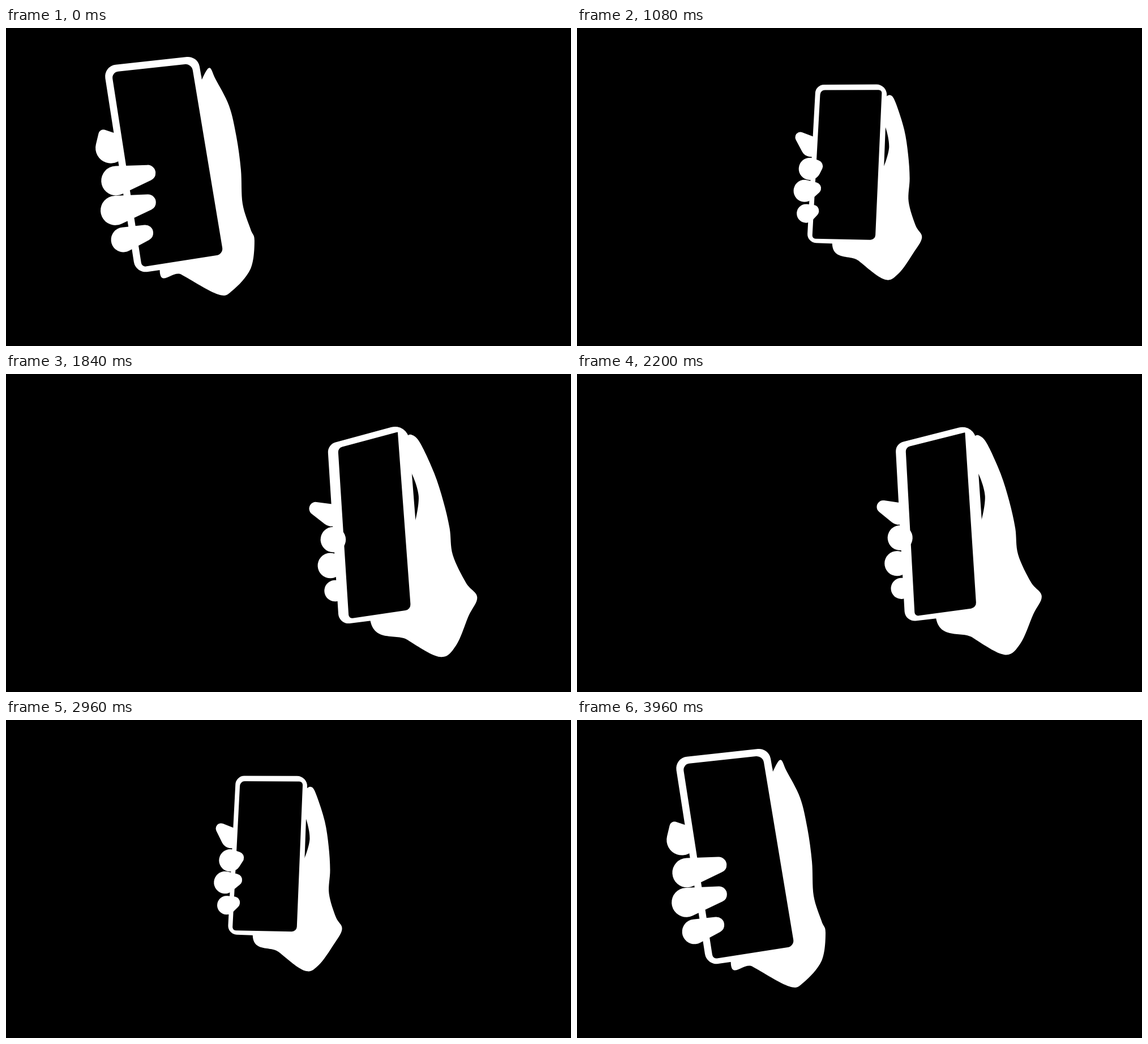
An HTML page with a canvas that plays this animation: 998x561 px, repeating every 4 s.

```html
<!DOCTYPE html>
<html lang="en">
<head>
<meta charset="utf-8">
<title>Hand turning a phone</title>
<style>
  html, body { margin: 0; width: 100%; height: 100%; overflow: hidden; background: #000; }
  canvas { display: block; width: 100%; height: 100%; }
</style>
</head>
<body>
<canvas id="stage" width="998" height="561"></canvas>
<script>
const ctx = document.getElementById('stage').getContext('2d');
const LOOP = 4000, STEP = 40, TURN = 1990;
const WHITE = '#fff', BLACK = '#000';

// Ends of the phone's left edge, perspective skew, screen inset, and how far the hand has swung.
const TIMES = [0, 640, 1380, TURN];
const KEYS = {
  left: [172, 300, 493.5, 574],
  top: [67, 87, 109, 126],
  footX: [229, 307, 484, 598],
  footY: [433, 392, 394, 448],
  skew: [0.021, 0.004, -0.055, -0.095],
  inset: [0.034, 0.018, 0.046, 0.057],
  swing: [0, 0.5, 1, 1.15]
};

// Smooth curve through the keys, at rest at both ends.
function track(values) {
  const m = values.map(() => 0);
  for (let pass = 0; pass < 40; pass++) {
    for (let i = 1; i < values.length - 1; i++) {
      const a = TIMES[i] - TIMES[i - 1], b = TIMES[i + 1] - TIMES[i];
      const pull = (values[i] - values[i - 1]) / (a * a) + (values[i + 1] - values[i]) / (b * b);
      m[i] = (3 * pull - m[i - 1] / a - m[i + 1] / b) / (2 / a + 2 / b);
    }
  }
  return u => {
    let i = 0;
    while (i < TIMES.length - 2 && u >= TIMES[i + 1]) i++;
    const h = TIMES[i + 1] - TIMES[i], s = (u - TIMES[i]) / h, r = 1 - s;
    return values[i] * r * r * (1 + 2 * s) + values[i + 1] * s * s * (3 - 2 * s)
      + h * s * r * (m[i] * r - m[i + 1] * s);
  };
}

const tracks = Object.entries(KEYS).map(([name, values]) => [name, track(values)]);
const poseAt = u => Object.fromEntries(tracks.map(([name, f]) => [name, f(u)]));
const mix = (a, b, k) => a + (b - a) * k;

// Outline of palm and thumb, from the thumb round the wrist, in units of the phone's height.
const HAND_OPEN = [
  [.423, .18], [.454, .117], [.498, .064], [.519, .122], [.563, .258],
  [.575, .412], [.572, .573], [.555, .738], [.574, .866], [.584, .923],
  [.545, 1.056], [.444, 1.147], [.374, 1.156], [.215, 1.036], [.123, .965]
];
const HAND_TURNED = [
  [.419, .141], [.445, .075], [.479, .071], [.516, .125], [.578, .286],
  [.615, .438], [.637, .583], [.642, .723], [.7, .87], [.751, .946],
  [.699, 1.039], [.616, 1.175], [.526, 1.22], [.354, 1.113], [.167, .959]
];

const FINGERS = [
  { x: -0.015, y: 0.55, r: 0.07, reach: 0.112 },
  { x: -0.04, y: 0.69, r: 0.07, reach: 0.092 },
  { x: -0.023, y: 0.833, r: 0.059, reach: 0.057 }
];

// Maps phone units to the stage: scale and tilt of the left edge, plus the skew.
function placer({ left, top, footX, footY, skew }) {
  const dx = footX - left, dy = footY - top;
  return ([x, y]) => {
    const v = y + skew * x / 0.45 * (1 - 0.7 * y);
    return [left + x * dy + v * dx, top - x * dx + v * dy];
  };
}

function fillBlob(points, color) {
  const n = points.length, at = i => points[(i + n) % n];
  ctx.fillStyle = color;
  ctx.beginPath();
  ctx.moveTo(...points[0]);
  for (let i = 0; i < n; i++) {
    const [a, b, c, d] = [at(i - 1), at(i), at(i + 1), at(i + 2)];
    ctx.bezierCurveTo(
      b[0] + (c[0] - a[0]) / 6, b[1] + (c[1] - a[1]) / 6,
      c[0] - (d[0] - b[0]) / 6, c[1] - (d[1] - b[1]) / 6, ...c);
  }
  ctx.fill();
}

function fillQuad(corners, radii, color) {
  const [first, , , last] = corners;
  ctx.fillStyle = color;
  ctx.beginPath();
  ctx.moveTo((first[0] + last[0]) / 2, (first[1] + last[1]) / 2);
  corners.forEach((c, i) => ctx.arcTo(...c, ...corners[(i + 1) % 4], radii[i]));
  ctx.fill();
}

// Two circles and the tangents that join them.
function fillCapsule(p, r, q, s, color) {
  const dx = q[0] - p[0], dy = q[1] - p[1];
  const a = Math.atan2(dy, dx);
  const b = Math.acos(Math.max(-1, Math.min(1, (r - s) / Math.hypot(dx, dy))));
  ctx.fillStyle = color;
  ctx.beginPath();
  ctx.arc(...p, r, a + b, a - b + 2 * Math.PI);
  ctx.arc(...q, s, a - b, a + b);
  ctx.fill();
}

function drawHand(pose, place) {
  const { swing } = pose;
  const outline = HAND_OPEN.map((p, i) => p.map((v, axis) => mix(v, HAND_TURNED[i][axis], swing)));
  fillBlob(outline.map(place), WHITE);
  const bulge = 0.44 + 0.046 * Math.min(1, 2 * swing);
  fillBlob([[.435, .23], [bulge, .39], [.435, .56], [.42, .4]].map(place), BLACK);
}

function drawPhone({ skew, inset, size }, place) {
  const scale = r => Math.max(0.002, r) * size;
  const body = [[0, 0], [.452, 0], [.468, 1], [0, 1]];
  fillQuad(body.map(place), [.056, .06 - 0.2 * skew, .04, .056].map(scale), WHITE);
  const far = 1.1 * inset;
  const glass = [[inset, .034], [.455 - far, .034], [.465 - far, .968], [inset, .974]];
  fillQuad(glass.map(place), [.03, .028 + 0.3 * skew, .032, .02].map(scale), BLACK);
}

function drawIndex({ swing, size }, place) {
  const tip = place([-0.05 - 0.033 * swing, 0.325 + 0.01 * swing]);
  const base = place([-0.025 + 0.02 * swing, 0.392]);
  fillCapsule(base, (0.073 - 0.01 * swing) * size, tip, (0.024 + 0.011 * swing) * size, WHITE);
}

function drawFinger({ x, y, r, reach }, { swing, size }, place) {
  const height = y - 0.02 * swing;
  const knuckle = place([x + 0.02 * (swing - 0.5), height]);
  const tip = place([0.018 + (1 - swing) * reach, height - 0.018]);
  fillCapsule(knuckle, r * size, tip, 0.038 * size, WHITE);
}

function draw(now) {
  const t = Math.floor(now % LOOP / STEP) * STEP;
  const pose = poseAt(t < TURN ? t : 2 * TURN - t);
  pose.size = Math.hypot(pose.footX - pose.left, pose.footY - pose.top);
  const place = placer(pose);
  ctx.fillStyle = BLACK;
  ctx.fillRect(0, 0, 998, 561);
  drawHand(pose, place);
  drawIndex(pose, place);
  drawPhone(pose, place);
  for (const finger of FINGERS) drawFinger(finger, pose, place);
  requestAnimationFrame(draw);
}
requestAnimationFrame(draw);
</script>
</body>
</html>
```
